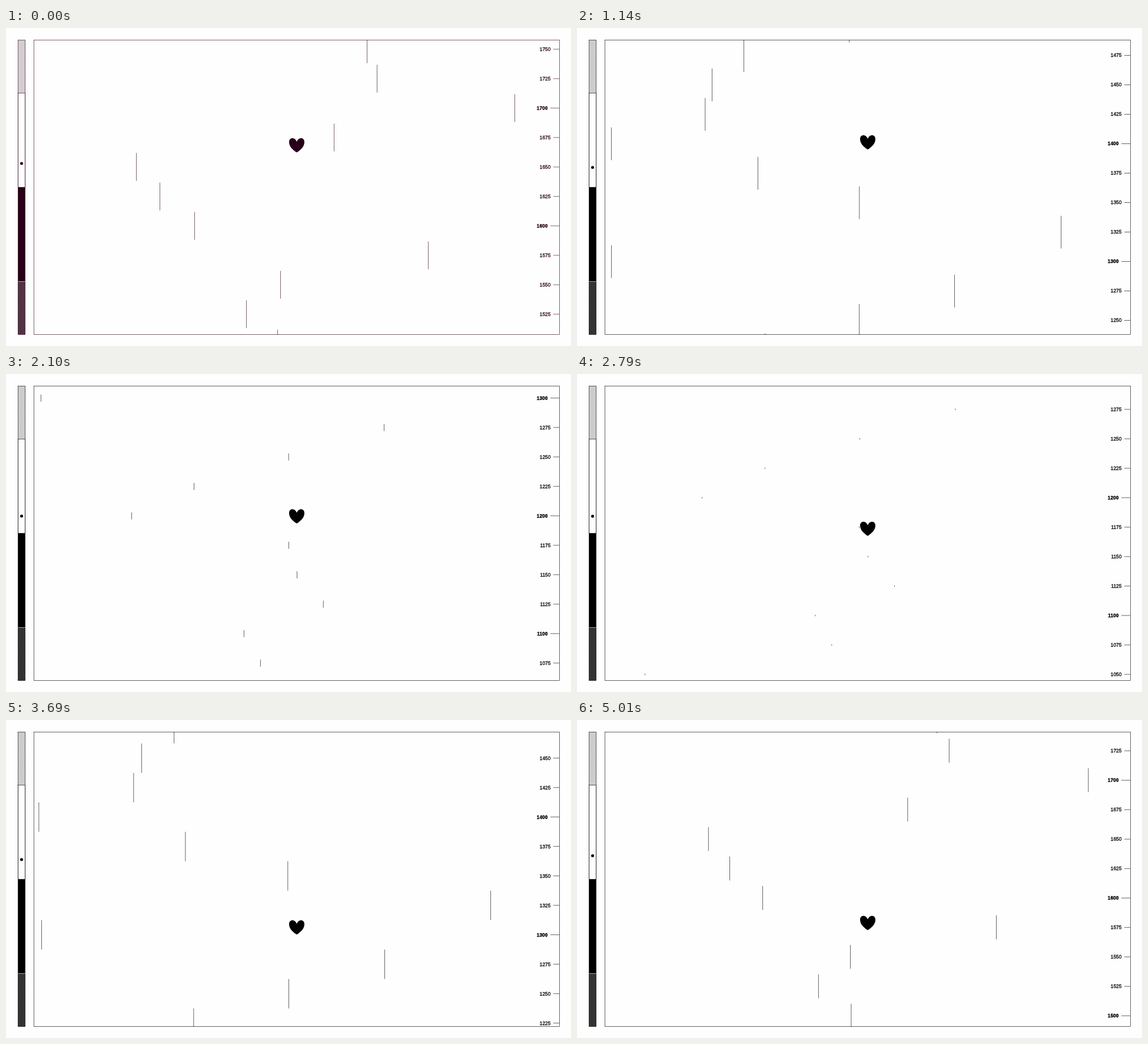
Animation of 960x540 px, one loop 5.04 s. Source, as an HTML page with a canvas:

```html
<!DOCTYPE html>
<html lang="en">
<head>
<meta charset="utf-8">
<title>Heart altitude</title>
<style>
html, body { margin: 0; width: 100%; height: 100%; overflow: hidden; background: #fefefe; }
canvas { display: block; width: 960px; height: 540px; }
</style>
</head>
<body>
<canvas id="stage" width="960" height="540"></canvas>
<script>
const ctx = document.getElementById('stage').getContext('2d');
const PAPER = '#fefefe';
const STEP = 30, LOOP = 5040, HOLD = 140;
const GRAVITY = 0.0314;
const BRAKE = 51, LIFT = 93;
const MID_X = 494, MID_Y = 270.5;
const TOP_VALUE = 1750, SPACING = 25;
const HAIR = 0.6;

// Where the scattered streaks start, from the highest altitude down.
const STREAKS = [
  613, 630, 864, 557, 221, 261, 320, 717, 466, 408, 461, 282, 229, 218, 59,
  308, 480, 822, 57, 640, 479, 320, 215, 482, 495, 538, 402, 430, 114
];

// Sideways drift in px per second swings from streak to streak.
const drift = i => Math.sin((i - 0.5) * Math.PI / 4);

// Altitude, speed and the heart's offset: free fall, braking to a hover, launch.
function flight(n) {
  if (n <= BRAKE) {
    return {
      alt: 1632.75 - 6.5 * n - GRAVITY / 2 * n * n,
      speed: -6.5 - GRAVITY * n,
      sway: -71 - 16 * (n / BRAKE) ** 4
    };
  }
  if (n <= LIFT) {
    const m = n - BRAKE, tau = 11.5, fade = Math.exp(-m / tau);
    return {
      alt: 1260.5 - 8.1 * tau * (1 - fade),
      speed: -8.1 * fade,
      sway: -87 * Math.exp(-m / 17)
    };
  }
  const m = n - LIFT, tau = 5.54, fade = Math.exp(-m / tau);
  return {
    alt: 1169.75 + 7.87 * m - GRAVITY / 2 * m * m - 8.08 * tau * (1 - fade),
    speed: 7.87 - GRAVITY * m - 8.08 * fade,
    sway: 194.3 - 1.438 * m - 201.8 * Math.exp(-m / 28)
  };
}

function hatch(top, height, color) {
  ctx.save();
  ctx.beginPath();
  ctx.rect(20.5, top, 12, height);
  ctx.clip();
  ctx.strokeStyle = color;
  ctx.lineWidth = HAIR;
  ctx.beginPath();
  for (let y = top - 14; y < top + height; y += 3) {
    ctx.moveTo(20, y);
    ctx.lineTo(34, y + 14);
  }
  ctx.stroke();
  ctx.restore();
}

function outline(x, y, w, h, ink) {
  ctx.strokeStyle = ink;
  ctx.lineWidth = HAIR;
  ctx.strokeRect(x, y, w, h);
}

function drawGauge(alt, ink) {
  hatch(20.5, 90, ink);
  ctx.fillStyle = ink;
  ctx.fillRect(20.5, 270.5, 12, 250);
  hatch(430.5, 90, PAPER);
  outline(20.5, 20.5, 12, 500, ink);
  outline(20.5, 110.5, 12, 160, ink);
  ctx.fillStyle = PAPER;
  ctx.fillRect(20.5, 430.2, 12, HAIR);
  ctx.fillStyle = ink;
  ctx.beginPath();
  ctx.arc(26.5, 270.8 - alt / 40, 2.5, 0, Math.PI * 2);
  ctx.fill();
}

function drawHeart(x, y, ink) {
  ctx.save();
  ctx.translate(x, y);
  ctx.fillStyle = ink;
  ctx.beginPath();
  for (const s of [-1, 1]) {
    ctx.moveTo(0, -6);
    ctx.bezierCurveTo(s * 1.6, -10, s * 4.4, -12, s * 7.2, -12);
    ctx.bezierCurveTo(s * 11, -12, s * 13, -9, s * 13, -5.3);
    ctx.bezierCurveTo(s * 13, 2, s * 7, 8, 0, 12.3);
  }
  ctx.fill();
  ctx.restore();
}

function drawLabel(value, x, y, bold) {
  ctx.font = (bold ? 'bold ' : '') + '8.3px "Liberation Sans", Arial, sans-serif';
  ctx.lineWidth = 0.3;
  ctx.fillText(value, x, y);
  ctx.strokeText(value, x, y);
}

function drawField(alt, speed, seconds, ink) {
  const length = Math.abs(speed) * 7.1 + 1;
  ctx.save();
  ctx.beginPath();
  ctx.rect(47, 20, 894, 501);
  ctx.clip();
  ctx.fillStyle = ctx.strokeStyle = ink;
  ctx.textAlign = 'right';
  STREAKS.forEach((x, i) => {
    const value = TOP_VALUE - i * SPACING, y = MID_Y + (alt - value) * 2;
    const major = value % 100 === 0, left = major ? 925 : 930;
    ctx.fillRect(x + drift(i) * seconds, y - length / 2, HAIR, length);
    ctx.fillRect(left, y - HAIR / 2, 940 - left, HAIR);
    drawLabel(value, left - 4.7, y + 2.7, major);
  });
  ctx.restore();
  outline(47.5, 20.5, 893, 500, ink);
}

function draw(time) {
  const tick = Math.floor(time % LOOP / STEP);
  const n = tick > HOLD ? tick - 1 : tick;
  const { alt, speed, sway } = flight(n);
  const glow = Math.exp(-n / 14);
  const ink = `rgb(${Math.round(40 * glow)},0,${Math.round(24 * glow)})`;
  ctx.fillStyle = PAPER;
  ctx.fillRect(0, 0, 960, 540);
  drawGauge(alt, ink);
  drawField(alt, speed, n * STEP / 1000, ink);
  drawHeart(MID_X, MID_Y - 0.5 + sway, ink);
}

const start = performance.now();
function loop() {
  draw(performance.now() - start);
  requestAnimationFrame(loop);
}
loop();
</script>
</body>
</html>
```
